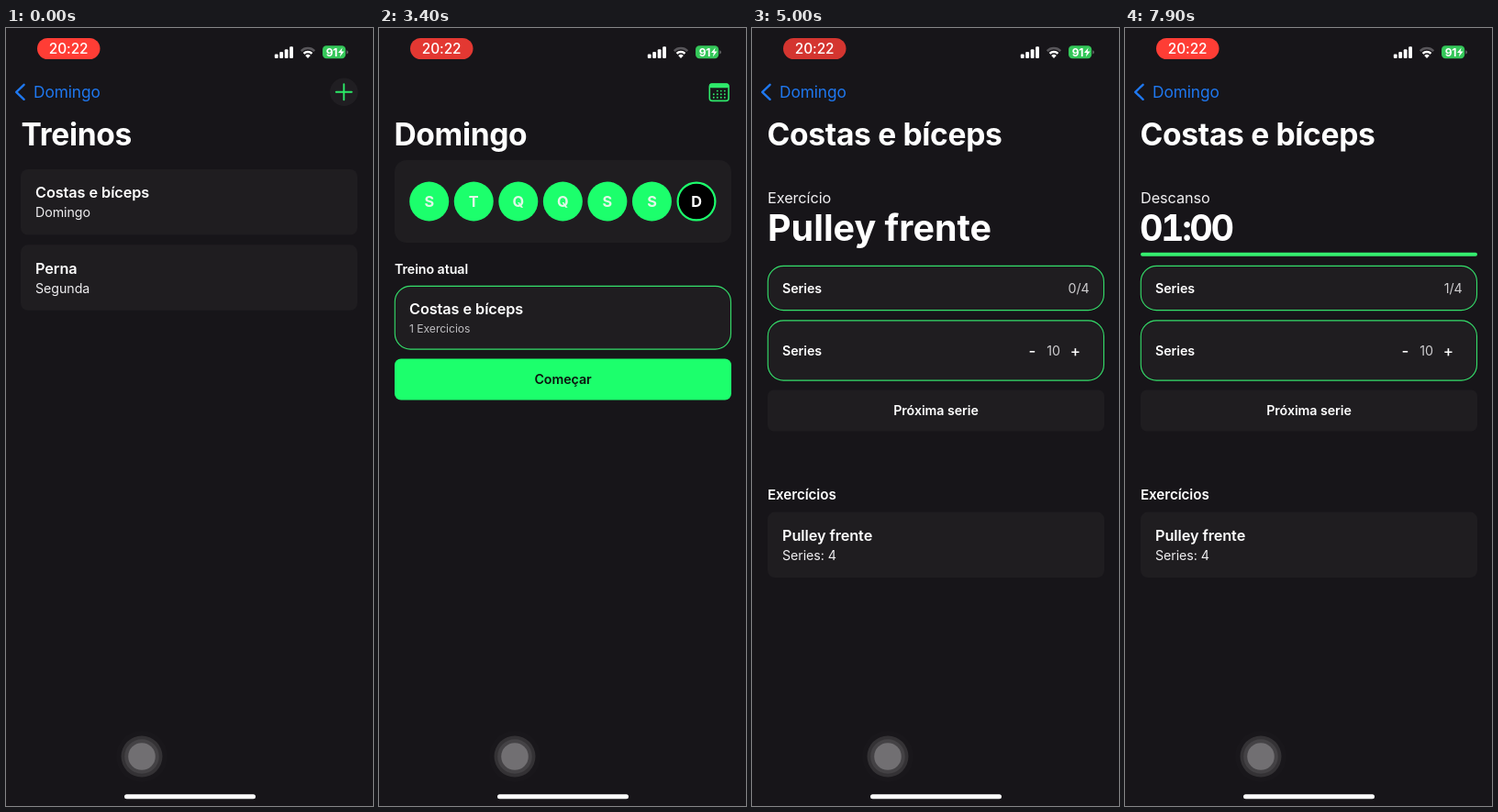
These frames come from a looping animation (400 px wide and 848 px high, 8 s). An HTML page:

```html
<!DOCTYPE html>
<html lang="pt">
<head>
<meta charset="utf-8">
<title>Treinos</title>
<style>
  html, body { margin: 0; width: 100%; height: 100%; overflow: hidden; background: #171519; }
  svg { display: block; width: 400px; height: 848px; }
  text {
    font-family: Inter, "Open Sans", sans-serif;
    font-optical-sizing: none;
    letter-spacing: -.005em;
    fill: #fff;
  }
  .title { font-size: 33.6px; font-weight: 700; letter-spacing: -.01em; }
  .big { font-size: 39.5px; font-weight: 700; letter-spacing: 0; }
  .timer { font-size: 39.5px; font-weight: 700; letter-spacing: -.062em; font-variant-numeric: tabular-nums; }
  .head { font-size: 16.3px; font-weight: 600; }
  .lead { font-size: 16.3px; fill: #f0eff1; }
  .section { font-size: 15.2px; font-weight: 600; }
  .strong { font-size: 14.25px; font-weight: 600; }
  .body { font-size: 14.25px; fill: #efeef0; }
  .value { font-size: 14.25px; fill: #cfced0; }
  .note { font-size: 12.2px; fill: #bdbcbf; }
  .step { font-size: 17px; font-weight: 500; }
  .day { font-size: 16.3px; font-weight: 700; }
  .back { font-size: 17.3px; fill: #1f78f0; letter-spacing: -.005em; }
  .clock { font-size: 15.4px; font-weight: 500; }
  .charge { font-size: 12px; font-weight: 700; letter-spacing: -.02em; }
</style>
</head>
<body>
<svg id="stage" viewBox="0 0 400 848"></svg>
<script>
const LOOP = 8000, POP = 1392, PUSH = 3814, REST = 7000;
const BG = '#171519', CARD = '#1f1d20', GREEN = '#1cff6c', LINE = '#35e06b';

const text = (x, y, cls, str, anchor = 'start', extra = '') =>
  `<text x="${x}" y="${y}" class="${cls}" text-anchor="${anchor}" ${extra}>${str}</text>`;
const rect = (x, y, w, h, r, fill, extra = '') =>
  `<rect x="${x}" y="${y}" width="${w}" height="${h}" rx="${r}" fill="${fill}" ${extra}/>`;
const disc = (x, y, r, fill, extra = '') =>
  `<circle cx="${x}" cy="${y}" r="${r}" fill="${fill}" ${extra}/>`;
const group = (id, body) => `<g id="${id}">${body}</g>`;
const card = (y, h, r = 8) => rect(17, y, 367, h, r, CARD);
const outlined = (y, h) =>
  rect(17.3, y + .4, 366.2, h - .8, 17, CARD, `stroke="${LINE}" stroke-width="1.1"`);
const row = (y, head, sub) =>
  card(y, 71.5) + text(33, y + 31.3, 'head', head) + text(33, y + 52.3, 'body', sub);

function homePage() {
  const days = [...'STQQSSD'].map((d, i) => {
    const x = 54.7 + i * 48.55, today = i === 6;
    const dot = today
      ? disc(x, 189, 20.4, '#000', `stroke="${GREEN}" stroke-width="2.2"`)
      : disc(x, 189, 21.5, GREEN);
    return dot + text(x, 195, 'day', d, 'middle', today ? '' : 'style="fill:#e2f7e8"');
  }).join('');
  return card(144, 90, 13) + days +
    text(17, 268, 'strong', 'Treino atual') +
    outlined(281, 69.5) +
    text(33, 312.3, 'head', 'Costas e bíceps') +
    text(33, 331.6, 'note', '1 Exercicios') +
    rect(17, 360.5, 367, 45, 7, GREEN) +
    text(200.5, 388.2, 'strong', 'Começar', 'middle', 'style="fill:#0c130e"');
}

const listPage = () =>
  row(154, 'Costas e bíceps', 'Domingo') + row(236.3, 'Perna', 'Segunda');

function workoutPage() {
  const work = text(17, 190.7, 'lead', 'Exercício') + text(17, 231.8, 'big', 'Pulley frente');
  const rest = text(17, 190.7, 'lead', 'Descanso') + text(16, 231.8, 'timer', '01:00') +
    rect(17, 244.8, 367, 4, 2, '#35ee6f');
  return group('work', work) + group('rest', rest) +
    outlined(259, 49) + text(33, 288.6, 'strong', 'Series') +
    text(367.6, 288.6, 'value', '0/4', 'end', 'id="count"') +
    outlined(318.5, 66) + text(33, 356.6, 'strong', 'Series') +
    text(305.5, 357.5, 'step', '-', 'middle') +
    text(328.7, 356.6, 'value', '10', 'middle') +
    text(352.5, 357.7, 'step', '+', 'middle') +
    card(394.5, 45, 7) + text(200.5, 422.2, 'strong', 'Próxima serie', 'middle') +
    text(17, 514, 'section', 'Exercícios') +
    row(527.6, 'Pulley frente', 'Series: 4');
}

function calendarIcon() {
  // Three rows of four days; the first day of the month is skipped.
  let dots = '';
  for (let i = 1; i < 12; i++) {
    dots += disc(364.8 + (i % 4) * 4, 68.6 + Math.floor(i / 4) * 3.6, .95, '#2fe96b');
  }
  return rect(360.3, 61, 20.8, 18.4, 3, 'none', 'stroke="#2fe96b" stroke-width="1.6"') +
    rect(360, 60.6, 21.4, 4.6, 2, '#2fe96b') + dots;
}

function statusBar() {
  const arc = (r, color) => {
    const d = r * Math.SQRT1_2;
    return `<path d="M${329 - d} ${32.4 - d}A${r} ${r} 0 0 1 ${329 + d} ${32.4 - d}" fill="none" stroke="${color}" stroke-width="2.5"/>`;
  };
  const bars = [4.6, 7, 9.8, 12.8]
    .map((h, i) => rect(292.8 + i * 5.45, 33 - h, 3.8, h, 1.1, '#fff')).join('');
  return rect(34, 11, 68.5, 23, 11.5, '#ff3d35', 'id="pill"') +
    text(68.2, 28, 'clock', '20:22', 'middle') + bars +
    arc(10.3, '#59575b') + arc(6.3, '#fff') +
    '<path d="M329 32.9l-2.8-2.9a4 4 0 0 1 5.6 0z" fill="#fff"/>' +
    rect(345, 19.3, 25.2, 14, 4.2, '#34c759') +
    '<path d="M371.3 24.2v4.4q1.6-.6 1.6-2.2t-1.6-2.2z" fill="#6b6a6d"/>' +
    text(355, 30.7, 'charge', '91', 'middle') +
    '<path d="M366.6 21.4l-4.6 5.6h2.9l-1.1 4.4 4.8-5.8h-3z" fill="#fff"/>';
}

const overlay = () =>
  disc(148, 794, 28, '#19171b') + disc(148, 794, 22.5, '#343235') +
  disc(148, 794, 18.8, '#444245') + disc(148, 794, 14.8, '#716f72') +
  rect(129, 835.2, 143, 5, 2.5, '#fff');

const stage = document.getElementById('stage');
stage.innerHTML = rect(0, 0, 400, 848, 0, BG) +
  group('home', homePage()) +
  rect(0, 0, 400, 848, 0, '#000', 'id="dim"') +
  group('top', rect(0, 0, 404, 848, 0, BG) + group('list', listPage()) + group('workout', workoutPage())) +
  group('homeTitle', text(0, 0, 'title', 'Domingo')) +
  text(16.6, 128.2, 'title', 'Treinos', 'start', 'id="topTitle"') +
  group('back',
    '<path d="M19.6 61.8L11.2 69.8L19.6 77.8" fill="none" stroke="#1f78f0" stroke-width="2.4" stroke-linecap="round" stroke-linejoin="round"/>' +
    text(30, 76, 'back', 'Domingo')) +
  group('calendar', calendarIcon()) +
  group('add', disc(368.3, 69.7, 15.3, '#201e22') +
    '<path d="M359.8 69.7h17M368.3 61.2v17" stroke="#2bea67" stroke-width="1.9" stroke-linecap="round"/>') +
  statusBar() + overlay();

const el = {};
stage.querySelectorAll('[id]').forEach(n => el[n.id] = n);

const shift = (n, x) => n.setAttribute('transform', `translate(${x.toFixed(2)} 0)`);
const fade = (n, a) => n.setAttribute('opacity', Math.max(0, Math.min(1, a)).toFixed(3));
const show = (n, on) => n.setAttribute('display', on ? 'inline' : 'none');

// Share of a critically damped move that is still left after ms.
function left(ms, speed = 18) {
  const x = Math.max(0, ms) / 1000 * speed;
  return (1 + x) * Math.exp(-x);
}
// How far the upper page covers the home page, 0 to 1.
const coverAt = (t, speed) => t < 2800 ? left(t - POP, speed) : 1 - left(t - PUSH, speed);

function draw(t) {
  const cover = coverAt(t, 18), nav = coverAt(t, 23);
  const first = t < 2800, resting = t >= REST;

  shift(el.home, -120 * cover);
  fade(el.dim, .1 * cover);
  shift(el.top, 400 * (1 - cover) - (first ? left(t) : 0));
  show(el.top, cover > .001);
  show(el.list, first);
  show(el.workout, !first);

  show(el.work, !resting);
  show(el.rest, resting);
  el.count.textContent = resting ? '1/4' : '0/4';

  // The home title shrinks into the back label.
  const x = 16.4 + 13.6 * nav, y = 128.2 - 52.2 * nav;
  el.homeTitle.setAttribute('transform',
    `translate(${x.toFixed(2)} ${y.toFixed(2)}) scale(${(1 - nav / 2).toFixed(4)})`);
  fade(el.homeTitle, 1 - nav * 1.6);
  fade(el.back, nav * 1.6 - .6);
  el.topTitle.textContent = first ? 'Treinos' : 'Costas e bíceps';
  shift(el.topTitle, 400 * (1 - nav));
  fade(el.topTitle, nav * 1.5);
  fade(el.calendar, 1 - nav);
  fade(el.add, first ? nav : 0);

  const pulse = (1 - Math.cos(t / 1000 * Math.PI)) / 2;
  const mix = (a, b) => Math.round(a + (b - a) * pulse);
  el.pill.setAttribute('fill', `rgb(${mix(255, 212)},${mix(61, 53)},${mix(53, 48)})`);
}

const start = performance.now();
function tick() {
  draw((performance.now() - start) % LOOP);
  requestAnimationFrame(tick);
}
tick();
</script>
</body>
</html>
```
